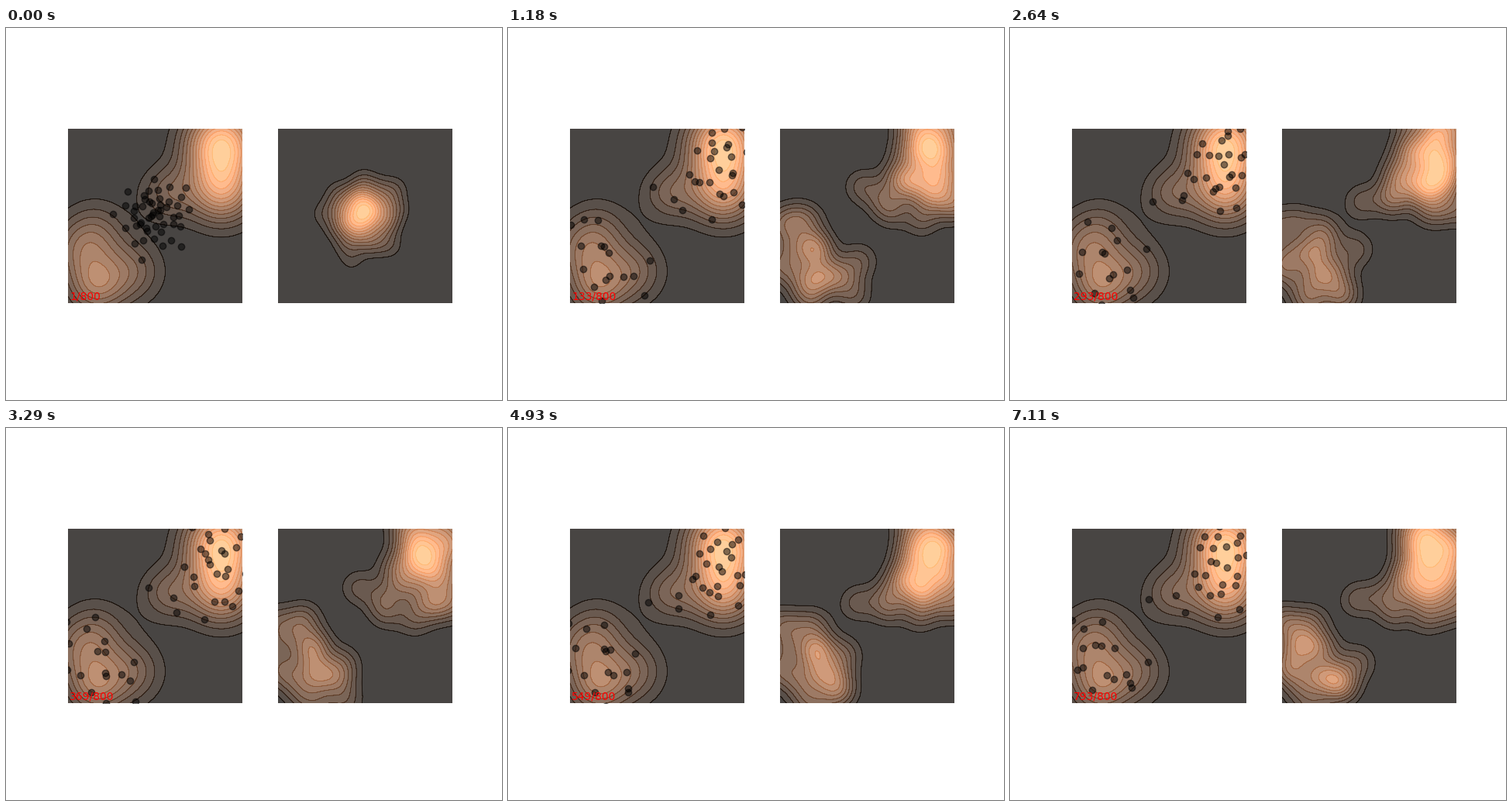
A matplotlib script that plays this animation: 640 px wide and 480 px high, repeating every 7.15 s.

```python
import numpy as np
import matplotlib.pyplot as plt
from matplotlib.animation import FuncAnimation

FRAMES, STRIDE, STEPS = 200, 4, 800
LOOP_MS = 7150
COUNT, BANDS = 50, 14
X0, X1, Y0, Y1 = 80, 305.45, 129.7, 355.1  # panel bounds in stage pixels
GOLDEN = np.pi * (3 - np.sqrt(5))

# Density on the left: x, y, weight, spread
BUMPS = np.array([(278, 149, .79, 31), (278, 207, .58, 30), (208, 213, .21, 24),
                  (118, 262, .16, 28), (98, 288, .25, 28), (116, 333, .34, 25),
                  (160, 314, .24, 28)])

rng = np.random.default_rng(7)


def cloud(x, y, width, n):
    """Evenly spread normal points on a golden-angle spiral."""
    j = np.arange(n)
    r = width * np.sqrt(-2 * np.log(1 - (j + .5) / n))
    turn = j * GOLDEN + x
    return np.column_stack([x + r * np.cos(turn), y + r * np.sin(turn)])


def by_diagonal(pts):
    return pts[np.argsort(pts[:, 0] - pts[:, 1])]


def rest_points():
    mass = BUMPS[:, 2] * BUMPS[:, 3] ** 2
    counts = np.round(COUNT * mass / mass.sum()).astype(int)
    return np.vstack([cloud(x, y, .8 * s, n) for (x, y, _, s), n in zip(BUMPS, counts)])


home = by_diagonal(rest_points())
start = cloud(192, 241, 22, len(home))
start = by_diagonal(start + rng.normal(0, 4, start.shape))

shape = (3,) + home.shape
period = rng.uniform(28, 80, shape)
phase = rng.uniform(0, 2 * np.pi, shape)


def wander(i):
    return 4 * np.sin(2 * np.pi * i / period + phase).sum(axis=0)


def spread(i):
    return 1 - np.exp(-i / 5)


def particles(i):
    return start + spread(i) * (home - start + wander(i))


def bell(grid, centre, width):
    return np.exp(-(grid[:, None] - centre) ** 2 / (2 * width ** 2))


def mixture(gx, gy, px, py, weight, width):
    return (bell(gy, py, width) * weight) @ bell(gx, px, width).T


def relief(ax, gx, gy, z):
    top = z.max()
    levels = np.linspace(0, top * 1.0001, BANDS + 1)
    ax.contourf(gx, gy, z, levels, cmap="copper", alpha=.75)
    ax.contour(gx, gy, z, levels[1:-1], cmap="copper", vmin=0, vmax=top, linewidths=.5)


def axis_grid(n):
    return np.linspace(X0, X1, n), np.linspace(Y0, Y1, n)


fig, (left, right) = plt.subplots(1, 2, figsize=(6.4, 4.8), dpi=100)
for ax in (left, right):
    ax.set(xlim=(X0, X1), ylim=(Y1, Y0), aspect="equal")
    ax.axis("off")

fine, coarse = axis_grid(110), axis_grid(72)
relief(left, *fine, mixture(*fine, *BUMPS.T))
dots, = left.plot([], [], "ko", ms=6, alpha=.5)
label = left.text(82, 350, "", color="red", fontsize=10, family="DejaVu Sans")


def update(i):
    x, y = particles(i).T
    dots.set_data(x, y)
    label.set_text(f"{i * STRIDE + 1}/{STEPS}")
    for art in list(right.collections):
        art.remove()
    relief(right, *coarse, mixture(*coarse, x, y, 1, 12 + 4 * spread(i)))
    return dots, label


anim = FuncAnimation(fig, update, frames=FRAMES, interval=LOOP_MS / FRAMES,
                     init_func=lambda: update(0), repeat=True)
plt.show()
```
